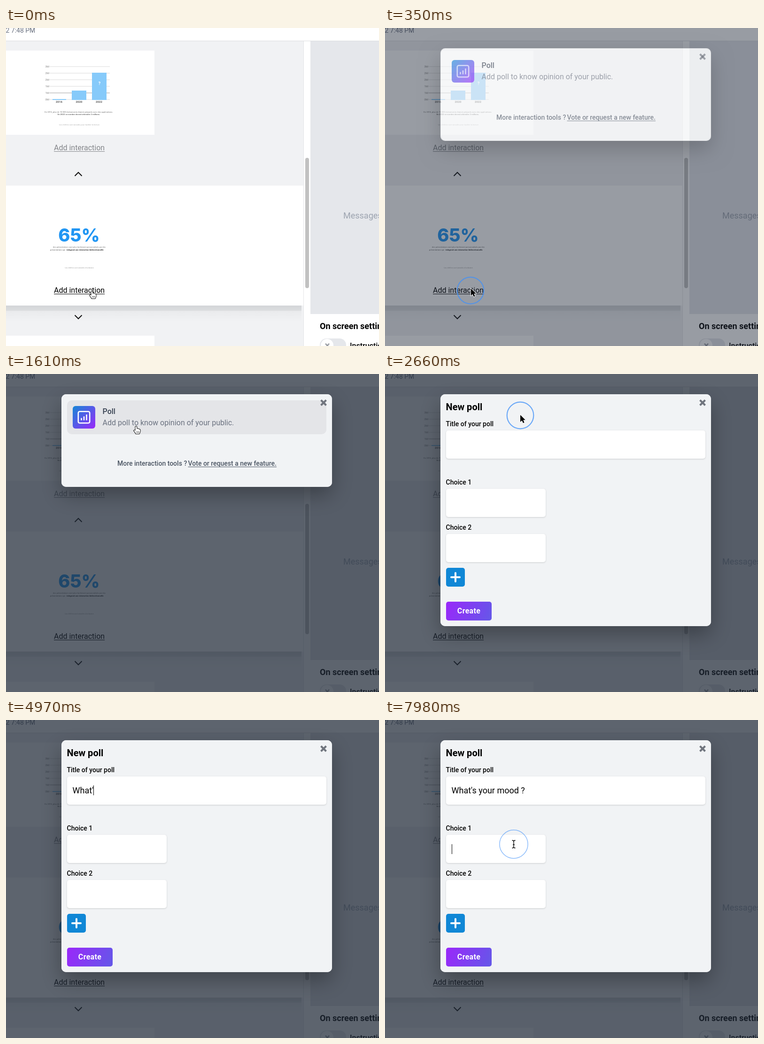
These frames come from a looping animation (794 px wide and 676 px high, 8000 ms). An HTML page with a canvas:

```html
<!DOCTYPE html>
<html lang="en">
<head>
<meta charset="utf-8">
<title>New poll</title>
<style>
  html, body { margin: 0; width: 100%; height: 100%; overflow: hidden; background: #fff; }
  canvas { display: block; width: 794px; height: 676px; }
</style>
</head>
<body>
<canvas id="stage" width="794" height="676"></canvas>
<script>
const W = 794, H = 676, LOOP = 8000, STEP = 70;
const ctx = document.getElementById('stage').getContext('2d');

const MODAL = { x: 118, y: 43, w: 576, menu: 197, form: 493 };
const TITLE = "What's your mood ?";
// Moment each character of the title appears
const KEYS = [4480, 4550, 4620, 4830, 4970, 5110, 5250, 5460, 5600, 5740,
  5880, 6020, 6160, 6300, 6440, 6510, 6580, 6790];
const CLICKS = [[140, 182, 558], [2450, 288, 88], [3570, 270, 147], [7700, 274, 264]];
// Pointer path: time, x, y
const PATH = [
  [0, 183, 559], [280, 183, 559], [350, 183, 554], [490, 194, 503], [630, 222, 385],
  [770, 254, 230], [910, 271, 145], [1050, 277, 118], [1610, 277, 111], [1890, 278, 110],
  [2310, 286, 92], [2450, 288, 87], [2870, 288, 87], [3430, 270, 147], [7210, 270, 147],
  [7630, 274, 264], [8000, 274, 264]
];

const clamp = v => Math.max(0, Math.min(1, v));
const ramp = (t, a, b) => clamp((t - a) / (b - a));
const between = (t, a, b) => t >= a && t < b;

function rect(x, y, w, h, fill, r = 0) {
  ctx.fillStyle = fill;
  ctx.beginPath();
  ctx.roundRect(x, y, w, h, r);
  ctx.fill();
}

function line(points, color, width, cap = 'butt') {
  ctx.strokeStyle = color;
  ctx.lineWidth = width;
  ctx.lineCap = cap;
  ctx.lineJoin = 'miter';
  ctx.beginPath();
  points.forEach(([x, y]) => ctx.lineTo(x, y));
  ctx.stroke();
}

function text(str, x, y, size, color, { weight = 400, align = 'left', under = false, family = 'Roboto' } = {}) {
  ctx.font = `${weight} ${size}px ${family}, sans-serif`;
  ctx.textAlign = align;
  ctx.fillStyle = color;
  ctx.fillText(str, x, y);
  if (under) ctx.fillRect(x, y + 2, ctx.measureText(str).width, 1);
}

function cross(x, y, r, color, width) {
  line([[x - r, y - r], [x + r, y + r]], color, width);
  line([[x - r, y + r], [x + r, y - r]], color, width);
}

function diagonal(x, y, w, h, from, to) {
  const g = ctx.createLinearGradient(x, y, x + w, y + h);
  g.addColorStop(0, from);
  g.addColorStop(1, to);
  return g;
}

function chart() {
  rect(0, 48, 316, 179, '#fff');
  ['3M', '2M', '2M', '1M', '1M', '0M'].forEach((label, i) => {
    const y = 82 + i * 14;
    rect(93, y - 0.5, 128, 1, i === 4 ? '#a2a2a2' : '#dcdcdc');
    text(label, 92, y + 2, 6, '#888', { align: 'right' });
  });
  const blue = '#86cafa';
  rect(99, 151, 29, 2, blue);
  rect(140, 133, 31, 20, blue);
  rect(183, 95, 31, 58, blue);
  text('?', 199, 121, 9, '#fff', { weight: 700, align: 'center' });
  ['2016', '2020', '2022'].forEach((label, i) =>
    text(label, 113 + i * 42.5, 159, 6, '#555', { weight: 700, align: 'center' }));
  const mid = { align: 'center' };
  text('En 2016, plus de 10 000 événements étaient préparés avec des applications.', 155, 180, 4.3, '#666', mid);
  text('En 2022 ce nombre devrait atteindre 2 millions.', 155, 185, 4.3, '#555', { align: 'center', weight: 500 });
  text('Les chiffres sont arrondis pour faciliter la lecture', 156, 207, 4, '#aaa', mid);
}

function page() {
  rect(0, 0, W, H, '#fff');
  rect(0, 28, 633, 307, '#f1f2f4');
  rect(0, 590, 633, 86, '#f1f2f4');
  rect(0, 27, W, 1, '#dcdde0');
  rect(633, 28, 1, 648, '#e4e5e8');
  text('2 7:48 PM', 62.3, 10, 14, '#6b7280', { align: 'right' });

  const shade = ctx.createLinearGradient(0, 590, 0, 624);
  shade.addColorStop(0, '#d3d5d8');
  shade.addColorStop(0.3, '#dbdddf');
  shade.addColorStop(0.36, '#eaebed');
  shade.addColorStop(1, '#f1f2f4');
  rect(0, 590, 629, 34, shade);

  chart();
  rect(0, 654, 316, 22, '#fff');
  text('Add interaction', 102, 260, 16, '#85878b', { under: true });
  line([[146.5, 314.5], [154, 307], [161.5, 314.5]], '#111', 2);
  line([[146.5, 610.5], [154, 618], [161.5, 610.5]], '#111', 2);

  const mid = { align: 'center' };
  text('65%', 155.5, 453.5, 38, '#2196f3', { align: 'center', weight: 800, family: 'Inter' });
  text('des présentateurs sont plus facilement personnalisés par des', 156, 467, 4.1, '#666', mid);
  text('présentations qui', 94, 472.5, 4.2, '#555');
  text('intègrent une interaction bidirectionnelle', 129, 472.5, 4.3, '#222', { weight: 700 });
  text('Les chiffres sont arrondis à la dizaine', 156, 511, 3.7, '#999', mid);
  text('Add interaction', 102, 563, 16, '#000', { under: true });

  rect(637, 276, 8, 277, '#c1c1c1', 4);
  rect(648, 28, 146, 580, '#e5e7eb');
  text('Messages', 718, 405, 18, '#9ca3af');
  text('On screen settings', 668, 640, 18, '#000', { weight: 700 });
  rect(668, 660, 56, 28, '#e5e7eb', 14);
  rect(670, 661, 27, 27, '#fff', 13.5);
  cross(684, 675, 4, '#9b9ea5', 2.6);
  text('Instructions', 732, 681, 16, '#000', { weight: 500 });
}

// Dims the page around the modal, casts its shadow and fills it
function panel(h, alpha, dim) {
  const { x, y, w } = MODAL;
  ctx.save();
  ctx.beginPath();
  ctx.rect(0, 0, W, H);
  ctx.roundRect(x + 1, y + 1, w - 2, h - 2, 9);
  ctx.clip('evenodd');
  ctx.globalAlpha = alpha;
  if (dim) rect(0, 0, W, H, 'rgba(31,41,55,0.72)');
  ctx.shadowColor = 'rgba(0,0,0,0.3)';
  ctx.shadowBlur = 44;
  ctx.shadowOffsetY = 18;
  rect(x, y, w, h, '#f1f3f5', 10);
  ctx.restore();
  ctx.globalAlpha = alpha;
  rect(x, y, w, h, '#f1f3f5', 10);
}

function menu(t, alpha) {
  panel(MODAL.menu, alpha, true);
  const hover = ramp(t, 910, 1050);
  if (hover) {
    ctx.globalAlpha = alpha * hover;
    rect(130, 56, 552, 72, '#e4e5e8', 10);
    ctx.globalAlpha = alpha;
  }
  rect(142, 68, 48, 48, diagonal(142, 68, 48, 48, '#1688d6', '#9a28fa'), 6);
  ctx.strokeStyle = '#fff';
  ctx.lineWidth = 2.6;
  ctx.beginPath();
  ctx.roundRect(153.8, 79.8, 24.4, 24.4, 3);
  ctx.stroke();
  [[160.5, 5], [166, 8.5], [171.5, 12.5]].forEach(([x, h]) => rect(x - 1.3, 98.5 - h, 2.6, h, '#fff', 1));
  text('Poll', 205.5, 85, 16, '#374151', { weight: 500 });
  text('Add poll to know opinion of your public.', 205.5, 109, 16, '#6b7280');
  text('More interaction tools ?', 237, 195, 14, '#4b5563', { weight: 500 });
  text('Vote or request a new feature.', 387.5, 195, 14, '#4b5563', { weight: 500, under: true });
  cross(676, 61, 5.5, '#70757e', 4);
  ctx.globalAlpha = 1;
}

function field(label, y, w) {
  text(label, 129.5, y - 9, 14, '#000', { weight: 500 });
  ctx.save();
  ctx.shadowColor = 'rgba(0,0,0,0.16)';
  ctx.shadowBlur = 3;
  ctx.shadowOffsetY = 1;
  rect(130, y, w, 60, '#fff', 5);
  ctx.restore();
}

function form(t, alpha) {
  panel(MODAL.form, alpha, alpha === 1);
  text('New poll', 129.5, 77, 20, '#000', { weight: 700 });
  cross(676, 61, 5.5, '#70757e', 4);
  field('Title of your poll', 120, 552);
  field('Choice 1', 244, 212);
  field('Choice 2', 340, 212);

  rect(130, 412, 40, 40, '#1087d6', 5);
  line([[141, 432], [159, 432]], '#fff', 4, 'round');
  line([[150, 423], [150, 441]], '#fff', 4, 'round');

  rect(130, 484, 97, 40, diagonal(130, 484, 97, 40, '#9a28fa', '#6458e8'), 5);
  ctx.letterSpacing = '0.3px';
  text('Create', 178.5, 509, 16, '#fff', { weight: 700, align: 'center' });
  ctx.letterSpacing = '0px';

  const typed = TITLE.slice(0, KEYS.filter(k => t >= k).length);
  text(typed, 141.5, 156, 18, '#000');
  const end = 141.5 + ctx.measureText(typed).width;
  if (between(t, 3640, 4060) || between(t, 4340, 7280)) rect(Math.floor(end), 139, 1, 21, '#000');
  if (t >= 7770) rect(142, 264, 1, 21, '#000');
  ctx.globalAlpha = 1;
}

function pointerAt(t) {
  let i = 0;
  while (i < PATH.length - 2 && t >= PATH[i + 1][0]) i++;
  const [t0, x0, y0] = PATH[i], [t1, x1, y1] = PATH[i + 1];
  let p = ramp(t, t0, t1);
  if (t > 2600) p = p * p * (3 - 2 * p);
  return [x0 + (x1 - x0) * p, y0 + (y1 - y0) * p];
}

function outline(path, fill, edge, width) {
  const p = new Path2D(path);
  ctx.lineJoin = 'round';
  ctx.strokeStyle = edge;
  ctx.lineWidth = width;
  ctx.stroke(p);
  ctx.fillStyle = fill;
  ctx.fill(p);
}

const cursors = {
  arrow() {
    outline('M0 0V15L3.5 11.8L6 17.3L8.6 16.2L6.2 10.8H10.8Z', '#000', '#fff', 1.8);
  },
  hand() {
    outline('M-1.5 1.2Q0 -0.8 1.4 1.2V5.6Q2.6 4.4 4 5.8Q5.4 5 6.3 6.5Q8.2 6.2 8.6 8V11Q8 13 6.8 16H-0.6Q-2 12.6 -5 9.6Q-4.6 7.4 -1.5 9.4Z', '#fff', '#111', 2);
    line([[1.2, 11], [1.2, 14]], '#111', 0.8);
    line([[3.4, 11], [3.4, 14]], '#111', 0.8);
    line([[5.6, 11], [5.6, 14]], '#111', 0.8);
  },
  beam() {
    for (const [color, w] of [['#fff', 3], ['#000', 1.3]]) {
      line([[0, -7], [0, 7]], color, w);
      line([[-3.5, -8], [-1.5, -8], [0, -6.5], [1.5, -8], [3.5, -8]], color, w);
      line([[-3.5, 8], [-1.5, 8], [0, 6.5], [1.5, 8], [3.5, 8]], color, w);
      line([[-2, 1], [2, 1]], color, w);
    }
  }
};

function pointer(t) {
  if (between(t, 4130, 7210)) return;
  const [x, y] = pointerAt(t);
  let kind = 'arrow';
  if (t < 280 || (t < 2520 && y < 128)) kind = 'hand';
  else if (t > 2600 && (between(y, 120, 180) || y > 244)) kind = 'beam';
  ctx.save();
  ctx.translate(x, y);
  cursors[kind]();
  ctx.restore();
}

function rings(t) {
  for (const [start, x, y] of CLICKS) {
    const age = t - start;
    if (age <= 0 || age >= 340) continue;
    ctx.globalAlpha = clamp((340 - age) / 75) * 0.75;
    ctx.strokeStyle = '#4090f8';
    ctx.lineWidth = age > 240 ? 1.5 : 2.2;
    ctx.beginPath();
    ctx.arc(x, y, 31.8 * (1 - Math.exp(-age / 95)), 0, Math.PI * 2);
    ctx.stroke();
    ctx.globalAlpha = 1;
  }
}

function draw(t) {
  const open = ramp(t, 210, 430), swap = ramp(t, 2500, 2640);
  page();
  if (open && swap < 1) menu(t, open);
  if (swap) form(t, swap);
  rings(t);
  pointer(t);
}

function frame() {
  const t = performance.now() % LOOP;
  draw(Math.floor(t / STEP) * STEP);
  requestAnimationFrame(frame);
}
frame();
</script>
</body>
</html>
```
